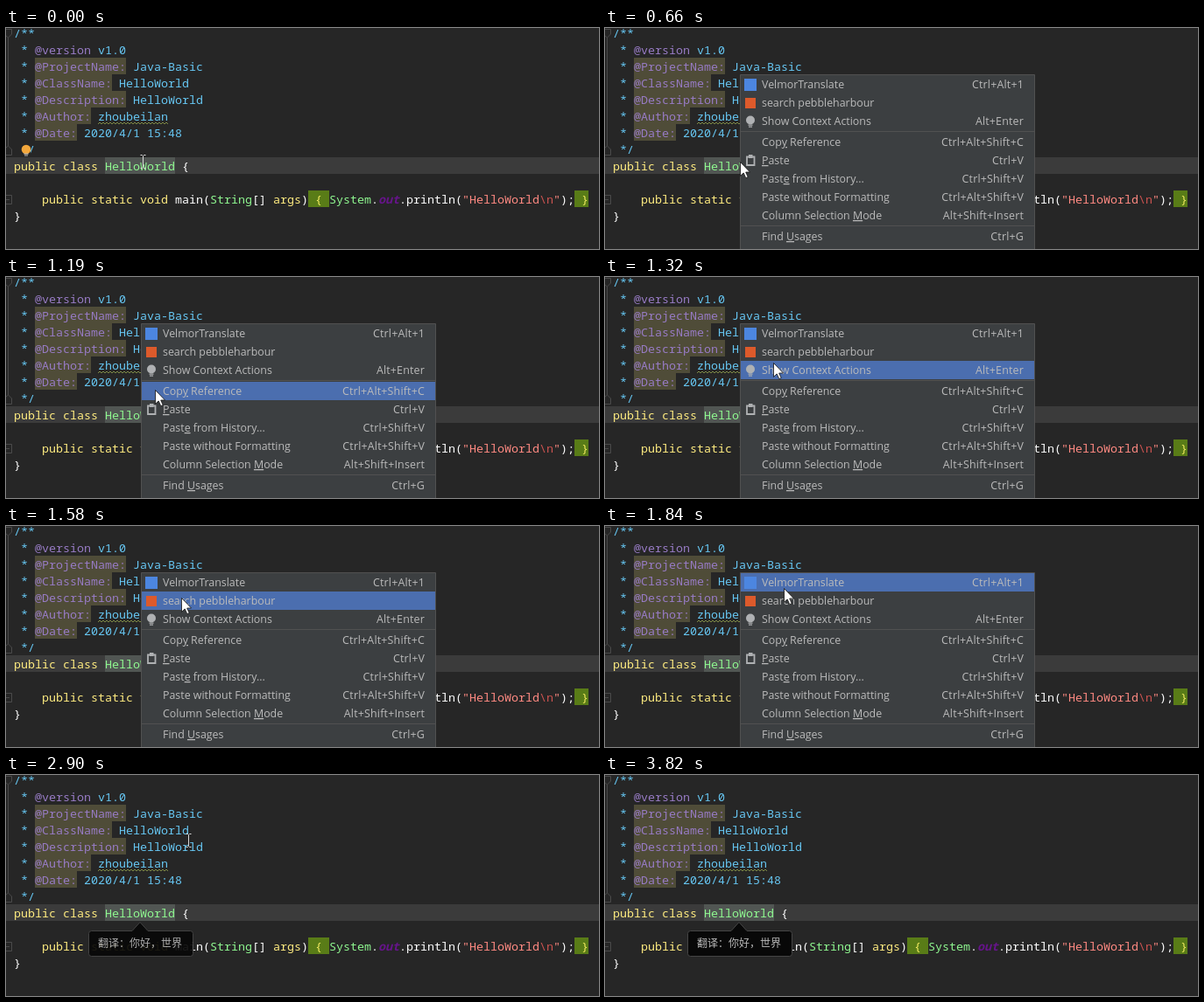
Recreate the animation shown at these times as an HTML page. Size 677 px wide and 253 px high, loop 3.95 s.

```html
<!DOCTYPE html>
<html lang="en">
<head>
<meta charset="utf-8">
<title>Editor translation popup</title>
<style>
html, body { margin: 0; width: 100%; height: 100%; overflow: hidden; background: #262626; }
svg { display: block; width: 677px; height: 253px; }
text { white-space: pre; }
.code { font: 13.333px "Noto Sans Mono", monospace; }
.menu { font: 12.4px "Open Sans", sans-serif; fill: #bbb; }
.keys { letter-spacing: .2px; }
.tip { font: 12px "Noto Sans CJK SC", "Noto Sans CJK", sans-serif; fill: #bbb; }
.doc { fill: #66c6f2; }
.tag { fill: #977bc4; }
.key { fill: #ffec80; }
.type { fill: #8ff890; }
.plain { fill: #fff; }
.str { fill: #ff8a82; }
.esc { fill: #cc5350; }
.fold { fill: #f2ea60; }
.field { fill: #66148a; font-weight: bold; font-style: italic; }
</style>
</head>
<body>
<svg id="stage" viewBox="0 0 677 253">
  <g id="code"></g>
  <g fill="#262626" stroke="#4a4a4a">
    <path d="M2.5 11V135" />
    <path d="M-1 1.5H6.5V7L2.5 11L-1 8Z" />
    <path d="M-1 145.5H6.5V139L2.5 135L-1 138Z" />
    <path d="M-1 191.5H6.5V201.5H-1M0 196.5H4" />
  </g>
  <g id="bulb">
    <path d="M17 132h11v15h-11z" fill="#262626" />
    <circle cx="23" cy="139" r="5.3" fill="#f3a73c" />
    <path d="M20.5 143.5h5v1.2h-5zM21 145.4h4v1.2h-4z" fill="#b5b5b5" />
  </g>
  <path id="caret" d="M152 148h2v19h-2z" fill="#eee" />
  <g id="tip">
    <path d="M97.500 178.500H144L153 168.500L162 178.500H210.500Q213.500 178.500 213.500 181.500V204.500Q213.500 207.500 210.500 207.500H97.500Q94.500 207.500 94.500 204.500V181.500Q94.500 178.500 97.500 178.500Z" fill="#080808" stroke="#454545" />
    <text class="tip" x="105" y="197">翻译：你好，世界</text>
  </g>
  <g id="menu">
    <path d="M154.500 53.500H490.500V260H154.500Z" fill="#3c3f41" stroke="#515151" />
    <path id="row" d="M155 0h335v21h-335z" fill="#4b6eaf" />
    <path d="M155 118.500H490M155 226.500H490" stroke="#515151" />
    <rect x="159" y="58" width="14" height="14" fill="#4c86e0" />
    <rect x="160" y="80" width="12" height="12" fill="#dd5a2b" />
    <circle cx="166" cy="105.500" r="5" fill="#afb1b3" />
    <path d="M163.500 110.500h5v1.200h-5zM164 112.500h4v1.200h-4z" fill="#afb1b3" />
    <path d="M162 147.500h8.500v9.500h-8.500z" fill="none" stroke="#afb1b3" stroke-width="1.800" />
    <path d="M164 145h4.500v4h-4.500z" fill="#afb1b3" />
  </g>
  <path id="beam" d="M-3 -7.500H-1L0 -6.500L1 -7.500H3M0 -6.500V6.500M-3 7.500H-1L0 6.500L1 7.500H3" fill="none" stroke="#d8d8d8" />
  <path id="arrow" d="M.5 .5V16.300L4.200 12.900L6.800 18.700L9.200 17.600L6.700 12H11.500Z" fill="#fff" stroke="#111" stroke-width=".8" />
</svg>
<script>
const NS = 'http://www.w3.org/2000/svg';
const $ = id => document.getElementById(id);
const add = (parent, name, attrs, text) => {
  const el = document.createElementNS(NS, name);
  for (const k in attrs) el.setAttribute(k, attrs[k]);
  if (text) el.textContent = text;
  return parent.appendChild(el);
};

// Editor: each row is a list of [class, text, background].
const LEFT = 9, COL = 8, ROW = 19, TOP = -4;
const TAG_BG = '#4f4c38', NAME_BG = '#515653', FOLD_BG = '#597c17';
const doc = (tag, value, bg) => [['doc', ' * '], ['tag', tag, bg], ['doc', ' ' + value]];
const rows = [
  [['doc', '/**']],
  doc('@version', 'v1.0'),
  doc('@ProjectName:', 'Java-Basic', TAG_BG),
  doc('@ClassName:', 'HelloWorld', TAG_BG),
  doc('@Description:', 'HelloWorld', TAG_BG),
  doc('@Author:', 'zhoubeilan', TAG_BG),
  doc('@Date:', '2020/4/1 15:48', TAG_BG),
  [['doc', ' */']],
  [['key', 'public class '], ['type', 'HelloWorld', NAME_BG], ['plain', ' {']],
  [],
  [['key', '    public static void '], ['plain', 'main('], ['type', 'String'], ['plain', '[] '],
   ['key', 'args'], ['plain', ')'], ['fold', ' { ', FOLD_BG], ['type', 'System'], ['plain', '.'],
   ['field', 'out'], ['plain', '.println('], ['str', '"HelloWorld'], ['esc', '\\n'], ['str', '"'],
   ['plain', ');'], ['fold', ' }', FOLD_BG]],
  [['plain', '}']]
];
const code = $('code');
add(code, 'rect', { x: 0, y: 148, width: 677, height: ROW, fill: '#3b3b3b' });
rows.forEach((tokens, i) => {
  let x = LEFT;
  const y = TOP + i * ROW;
  for (const [cls, text, bg] of tokens) {
    const width = text.length * COL;
    if (bg) add(code, 'rect', { x, y, width, height: ROW, fill: bg });
    // Leading blanks become an offset.
    const pad = text.length - text.trimStart().length;
    add(code, 'text', { class: 'code ' + cls, x: x + pad * COL, y: y + 15 }, text.trim());
    x += width;
  }
});
let wave = 'M105 110';
for (let x = 107; x <= 185; x += 2) wave += `L${x} ${x % 4 === 3 ? 108 : 110}`;
add(code, 'path', { d: wave, fill: 'none', stroke: '#7f8a45' });

// Menu: [centre y, label, shortcut]; "_" marks the underlined letter.
const items = [
  [65, 'VelmorTranslate', 'Ctrl+Alt+1'],
  [86, 'search pebbleharbour', ''],
  [107, 'Show Context Actions', 'Alt+Enter'],
  [131, 'Cop_y Reference', 'Ctrl+Alt+Shift+C'],
  [152, '_Paste', 'Ctrl+V'],
  [173, 'Past_e from History...', 'Ctrl+Shift+V'],
  [194, 'Paste without Formatting', 'Ctrl+Alt+Shift+V'],
  [215, 'Column Selection _Mode', 'Alt+Shift+Insert'],
  [239, 'Find _Usages', 'Ctrl+G']
];
for (const [y, label, keys] of items) {
  const line = add($('menu'), 'text', { class: 'menu', x: 179, y: y + 4 });
  const [head, tail] = label.split('_');
  add(line, 'tspan', {}, head);
  if (tail) {
    add(line, 'tspan', { 'text-decoration': 'underline' }, tail[0]);
    add(line, 'tspan', {}, tail.slice(1));
  }
  add($('menu'), 'text', { class: 'menu keys', x: 478, y: y + 4, 'text-anchor': 'end' }, keys);
}

// Timeline: [start ms, value...].
const LOOP = 3950;
const pointer = [
  [0, 'beam', 156.5, 153], [660, 'arrow', 154, 153], [1190, 'arrow', 170, 129],
  [1320, 'arrow', 192, 98], [1450, 'arrow', 196, 91], [1580, 'arrow', 200, 82],
  [1710, 'arrow', 204, 72], [1840, 'arrow', 204, 71], [2370, 'beam', 206.5, 72],
  [2900, 'beam', 208.5, 75], [3030, 'beam', 255.5, 103], [3160, 'beam', 343.5, 154],
  [3290, 'beam', 496.5, 243], [3420, '', 0, 0]
];
const hover = [[0, -1], [1190, 3], [1320, 2], [1450, 1], [1710, 0]];
const menu = [[0, 0], [660, 1], [2370, 0]];
const bulb = [[0, 1], [530, 0]];
const caret = [[0, 0], [2370, 1], [2900, 0], [3290, 1], [3820, 0]];
const tip = [[0, 0], [2640, .4], [2770, .75], [2900, .92], [3030, 1]];

const at = (table, t) => table.findLast(step => step[0] <= t);
const show = (id, alpha) => { $(id).style.opacity = alpha; };

function draw(t) {
  const [, kind, x, y] = at(pointer, t);
  for (const id of ['beam', 'arrow']) {
    show(id, +(id === kind));
    $(id).setAttribute('transform', `translate(${x} ${y})`);
  }
  const item = items[at(hover, t)[1]];
  show('row', item ? 1 : 0);
  if (item) $('row').setAttribute('transform', `translate(0 ${item[0] - 11})`);
  show('menu', at(menu, t)[1]);
  show('bulb', at(bulb, t)[1]);
  show('caret', at(caret, t)[1]);
  show('tip', at(tip, t)[1]);
}

const start = performance.now();
function tick() {
  draw((performance.now() - start) % LOOP);
  requestAnimationFrame(tick);
}
tick();
</script>
</body>
</html>
```
